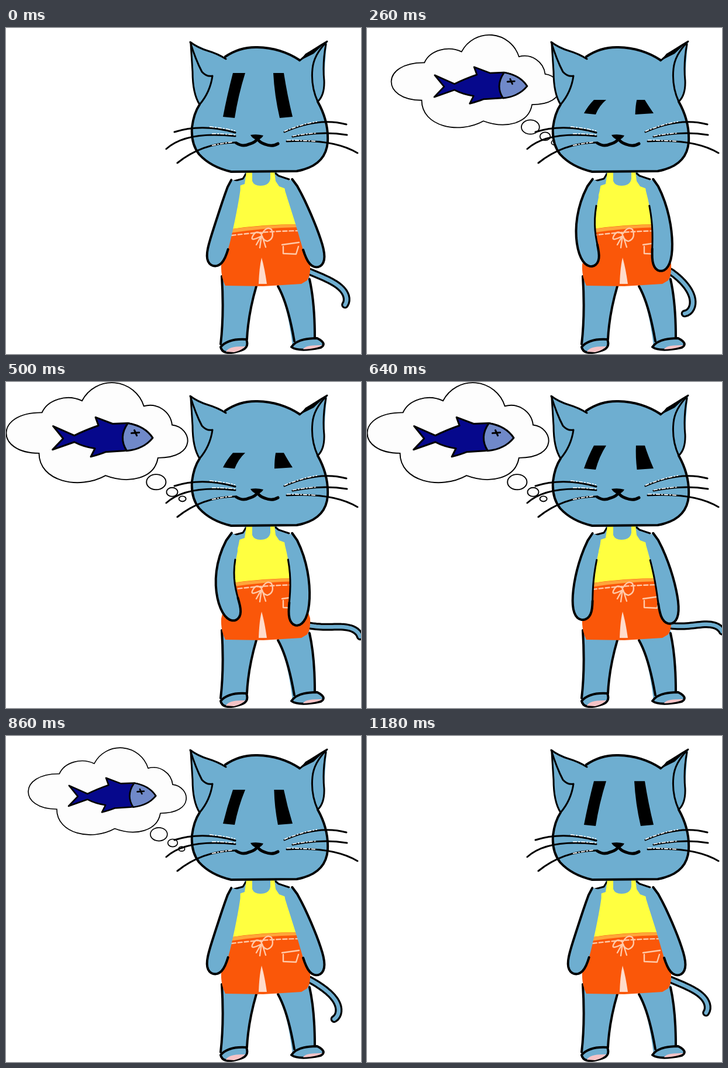
Recreate the animation shown at these times as an HTML page. Size 607x558 px, loop 1200 ms.

```html
<!DOCTYPE html>
<html lang="en">
<head>
<meta charset="utf-8">
<title>Hungry cat</title>
<style>
  html, body { margin: 0; width: 100%; height: 100%; overflow: hidden; background: #fff; }
  svg { display: block; width: 100vw; height: 100vh; }
  .ink { fill: none; stroke: #000; stroke-width: 4; stroke-linecap: round; stroke-linejoin: round; }
  .thin { stroke-width: 3; }
  .skin { fill: #6eaed0; }
  .pale { fill: none; stroke: #ffc9a8; stroke-width: 2.4; stroke-linecap: round; stroke-linejoin: round; }
  .glint { fill: none; stroke: #fff; stroke-width: 1.6; stroke-dasharray: 7 2 3 2; }
  .pink { fill: #f5c3c6; }
  .puff { fill: #fdfdfd; stroke: #000; stroke-width: 1.9; }
</style>
</head>
<body>
<svg viewBox="0 0 607 558" preserveAspectRatio="none">
  <g id="thought">
    <path class="puff" d="M62 122C-13 122 -13 52 67 53A47 38 0 0 1 135 33A57 57 0 0 1 240 42A38 38 0 0 1 288 74C322 78 332 130 264 130C258 165 215 175 175 160C130 185 62 170 62 122Z"/>
    <ellipse class="puff" cx="261" cy="171" rx="16.5" ry="13"/>
    <ellipse class="puff" cx="288" cy="188" rx="9.5" ry="7.5"/>
    <ellipse class="puff" cx="305.5" cy="199.5" rx="6" ry="4.5"/>
    <path class="ink thin" style="fill:#06088c" d="M86 76L122 92Q140 83 163 75L158 61L187 72L212 71Q242 76 255 96Q240 115 206 118L175 120Q165 124 150 128L157 114Q137 111 122 103L85 116L103 97Z"/>
    <path class="ink thin" style="fill:#7089c9" d="M213 71Q242 76 255 96Q240 115 211 118Q196 95 213 71Z"/>
    <path class="ink thin" d="M219 88L232 87M224 83L228 92"/>
  </g>

  <path id="tailInk" class="ink" style="stroke-width:13"/>
  <path id="tailSkin" class="ink" style="stroke:#6eaed0;stroke-width:6.5"/>

  <g id="legs">
    <path class="skin" d="M369 425Q373 490 366 545H411Q413 495 428 440V425ZM465 425V440Q482 478 490 545H530Q527 470 519 425Z"/>
    <path class="ink" d="M369 425Q373 490 367 541M428 442Q414 490 412 533M465 442Q482 472 493 536M519 430Q528 470 528 530"/>
    <path class="ink skin" style="fill:#6eaed0" d="M367 546Q380 531 411 533Q417 549 398 553Q370 561 367 546ZM488 546Q498 531 532 531Q550 540 538 547Q500 555 488 546Z"/>
    <path class="pink" d="M376 554Q381 544 409 545Q403 552 390 555ZM508 550Q511 542 541 543Q532 549 508 550Z"/>
  </g>

  <path class="skin" d="M409 244H461L466 252L484 260L500 350H386L388 262L406 258Z"/>
  <path class="ink thin" d="M410 250L405 258L386 263M461 249L466 253L484 259"/>

  <path fill="#ffff40" d="M411 246H421V262Q424 270 435 270Q450 270 452 258V246H459L461 262L467 271L486 278L499 335V342L384 349L396 290V271L408 267Z"/>
  <path fill="#fa5709" d="M382 352L387 344Q440 336 499 336L504 346Q508 370 520 404Q521 424 515 432L505 438L440 442L375 441Q367 425 368 405Q374 380 382 352Z"/>
  <path fill="#ffa53a" d="M382 351L387 344Q440 337 499 336L500 341Q440 342 382 351Z"/>
  <path class="pale" stroke-dasharray="7 4" d="M386 355Q440 348 500 347"/>
  <path class="pale" d="M437 356Q418 366 421 358Q427 344 437 353Q446 338 454 345Q460 360 447 365Q440 364 437 355L428 371M437 355L434 376M438 356L444 375M472 371L501 367M474 374V386L496 387L500 374"/>
  <path fill="#ffdccb" d="M437 393Q442 410 446 438H432Q433 410 437 393Z"/>

  <g id="arms"></g>

  <path class="skin" d="M316 25Q346 39 375 50Q400 32 430 33Q470 34 502 55Q525 39 549 24Q545 55 544 100Q541 118 533 126Q550 160 550 192Q548 235 497 246H388Q350 240 330 216Q316 198 318 170Q322 145 331 132Q322 120 320 100Z"/>
  <path class="ink" d="M375 49Q400 32 430 33Q470 34 502 55M533 126Q552 160 550 195Q547 236 497 245L385 246Q350 238 330 216Q316 198 318 170Q321 146 331 131"/>
  <path class="ink thin" d="M376 53Q362 44 345 39Q328 34 315 24Q324 54 335 75Q343 84 353 82Q349 110 331 131Q319 112 319 75L316 28M502 56Q520 40 549 23Q526 46 524 70Q521 100 533 126Q545 115 544 90Q541 60 547 28"/>
  <path d="M502 56L512 44L549 22L526 44Z"/>
  <path id="eyes"/>
  <path d="M418 183Q429 181 440 184Q437 190 429 192Q421 189 418 183Z"/>
  <path class="ink" style="stroke-width:5" d="M394 197Q405 204 415 199Q427 196 430 189Q433 196 443 199Q455 204 465 198"/>
  <path class="ink thin" d="M288 178Q335 163 392 179M274 207Q308 176 392 185M293 231Q335 197 392 196M476 178Q535 152 582 165M490 186Q540 176 583 183M480 194Q560 189 601 214"/>
  <path class="glint" d="M348 169Q372 171 392 176M352 181Q374 181 392 183M352 201Q372 197 388 195M476 177Q500 166 532 160M490 185Q510 181 530 180M480 192Q505 192 530 194"/>
</svg>

<script>
const LOOP = 1200, STEP = 20, SIDES = 18;
const { sin, cos, PI, hypot, sqrt, min } = Math;
const $ = id => document.getElementById(id);
const mix = (a, b, u) => a + (b - a) * u;
const line = pts => 'M' + pts.map(p => p.map(c => c.toFixed(2)).join(' ')).join('L');

// The bubble pops out of the head, stays, then sinks back in.
function drawThought(t) {
  let gone = 0, x = -6;
  if (t < 400) {
    gone = (1 - t / 400) ** 2.5;
    x += 574 * gone;
  } else if (t > 727) {
    gone = min(1, ((t - 727) / 370) ** 2);
    x += 277 * gone + 161 * gone ** 2;
  }
  const size = 1.007 * (1 - gone);
  $('thought').setAttribute('transform', `translate(${x} ${149 * gone - 1}) scale(${size})`);
  $('thought').setAttribute('visibility', size > 0.05 ? 'visible' : 'hidden');
}

// 0 is wide open, 1 is nearly shut.
function drawEyes(t) {
  const shut = t < 400 ? sin(PI / 2 * t / 400) : (1 - (t - 400) / 800) ** 1.5;
  const top = mix(77, 131, shut), low = mix(154, 147, shut);
  const mid = (top + low) / 2 - 3 * shut;
  $('eyes').setAttribute('d',
    `M388 ${top}H409Q397 ${mid} 391 ${low}L371 ${low - 2}Q378 ${mid} 388 ${top}Z` +
    `M${mix(457, 462, shut)} ${top}H475Q481 ${mid} 490 ${low - 2}` +
    `L${mix(468, 457, shut)} ${low}Q459 ${mid} ${mix(457, 462, shut)} ${top}Z`);
}

// A limb that widens along a bent axis and ends in a round hand.
function limb(shoulder, elbow, hand, side) {
  const outer = [], inner = [];
  for (let k = 0; k <= SIDES; k++) {
    const u = sin(PI / 2 * k / SIDES), v = 1 - u;
    const [x, y] = [0, 1].map(i => v * v * shoulder[i] + 2 * u * v * elbow[i] + u * u * hand[i]);
    const [dx, dy] = [0, 1].map(i => v * (elbow[i] - shoulder[i]) + u * (hand[i] - elbow[i]));
    const r = side * (8 + 11 * sqrt(u)) * sqrt(1 - u ** 10) / hypot(dx, dy);
    outer.push([x + dy * r, y - dx * r]);
    inner.unshift([x - dy * r, y + dx * r]);
  }
  return { outer, inner };
}

function addPath(cls) {
  const el = document.createElementNS('http://www.w3.org/2000/svg', 'path');
  el.setAttribute('class', cls);
  return $('arms').appendChild(el);
}

const armPose = [
  s => limb([393, 262], [mix(374, 354, s), 338], [mix(354, 401, s * s), 407], -1),
  s => limb([482, 262], [515, 336], [mix(534, 488, s * s), mix(409, 417, s)], 1)
];
const arms = armPose.map(pose => ({
  pose, fill: addPath('skin'), edge: addPath('ink'), seam: addPath('ink thin')
}));

function drawArms(t) {
  const swing = t < 800 ? sin(PI * t / 800) : 0;
  const wrist = SIDES * 0.55 | 0, pit = SIDES - 2;
  for (const { pose, fill, edge, seam } of arms) {
    const { outer, inner } = pose(swing);
    fill.setAttribute('d', line([...outer, ...inner]) + 'Z');
    edge.setAttribute('d', line([...outer, ...inner.slice(0, wrist)]));
    seam.setAttribute('d', line(inner.slice(wrist - 1, pit)));
    seam.setAttribute('opacity', min(1, 2 * swing));
  }
}

// The tail dips, swings high, dips again and half rises before the loop closes.
function drawTail(t) {
  const s = (t + LOOP - 160) % LOOP;
  const lift = s < 860 ? 1 - cos(2 * PI * s / 860) : sin(PI * (s - 860) / 340);
  const steps = 24, pts = [[519, 417]];
  for (let k = 0; k < steps; k++) {
    const u = (k + 0.5) / steps, [x, y] = pts[k];
    const a = (38 - 16 * lift + (54 - 48 * lift) * u + 97 * u ** 4) * PI / 180;
    pts.push([x + cos(a) * 93 / steps, y + sin(a) * 93 / steps]);
  }
  $('tailInk').setAttribute('d', line(pts));
  $('tailSkin').setAttribute('d', line(pts));
}

function draw(t) {
  drawThought(t);
  drawEyes(t);
  drawArms(t);
  drawTail(t);
}

const start = performance.now();
function tick() {
  const t = (performance.now() - start) % LOOP;
  draw(Math.floor(t / STEP) * STEP);
  requestAnimationFrame(tick);
}
tick();
</script>
</body>
</html>
```
